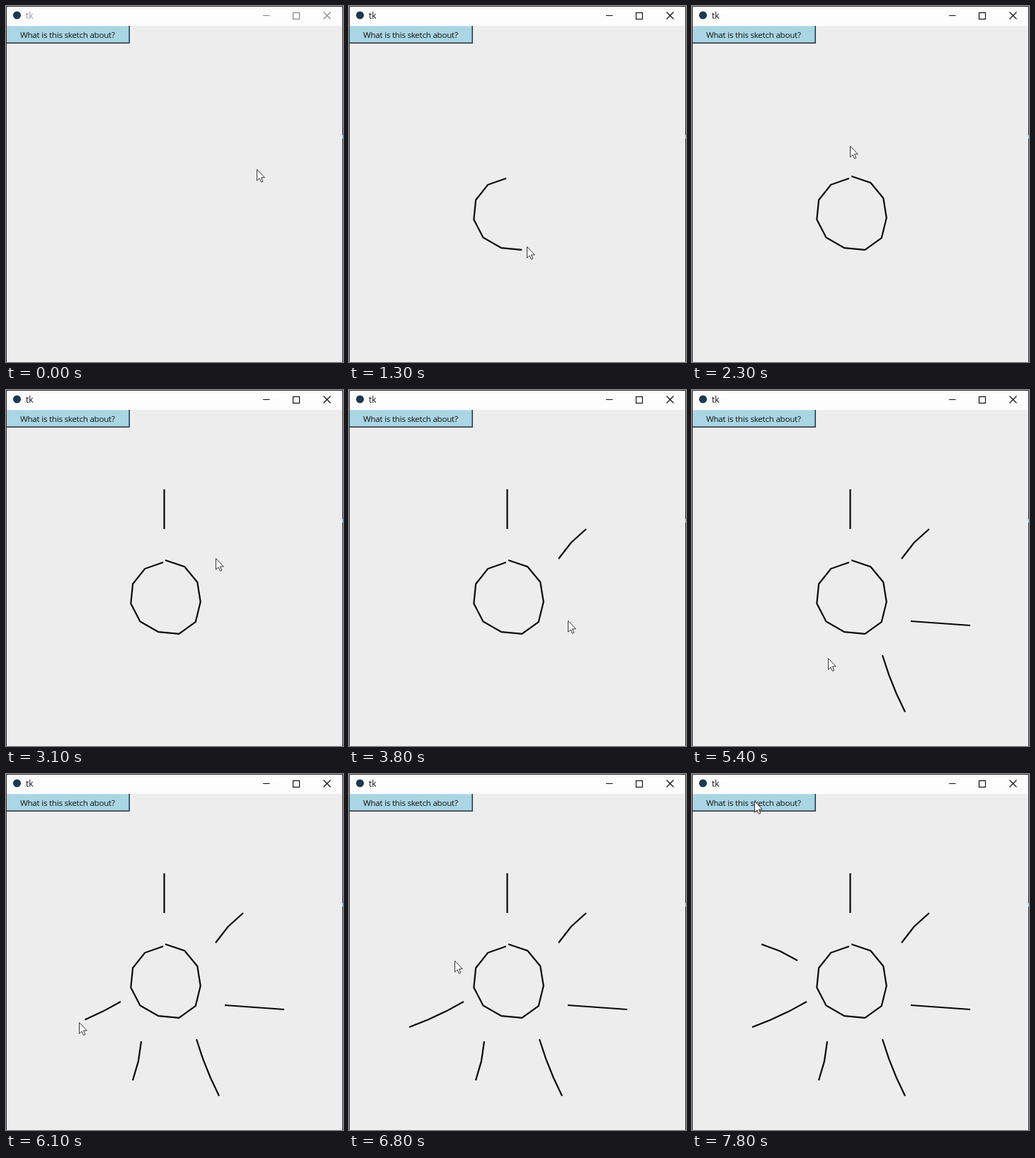
Animation of 476 by 502 pixels, one loop 8 s. Source, as an HTML page:

```html
<!DOCTYPE html>
<html lang="en">
<head>
<meta charset="utf-8">
<title>tk</title>
<style>
  html, body { margin: 0; width: 100%; height: 100%; overflow: hidden; background: #ededed; }
  svg { display: block; width: 476px; height: 502px; }
  text { font-family: "Open Sans", "Noto Sans", sans-serif; }
  .title { font-size: 12px; fill: #111; }
  .label { font-size: 11.6px; letter-spacing: -.24px; fill: #111; }
  .controls { fill: none; stroke: #111; stroke-width: 1.2; }
  .inactive .title { fill: #999; }
  .inactive .controls { stroke: #858585; }
  #ink { fill: none; stroke: #080808; stroke-width: 2.2; }
</style>
</head>
<body>
<svg id="stage" class="inactive" viewBox="0 0 476 502">
  <rect width="476" height="502" fill="#ededed"/>
  <rect width="476" height="28" fill="#fdfdfd"/>
  <circle cx="15.5" cy="13" r="5.5" fill="#1d3850"/>
  <text class="title" x="28" y="18">tk</text>
  <g class="controls">
    <path d="M363 13.5h9.5M448.5 8.5l10 10m0-10l-10 10"/>
    <rect x="405.5" y="9.5" width="9" height="9"/>
  </g>

  <rect y="28" width="175" height="25" fill="#2f3b40"/>
  <rect y="28" width="174" height="24" fill="#5f7a84"/>
  <rect y="28" width="173" height="23" fill="#c4e2ec"/>
  <rect x="1" y="29" width="172" height="22" fill="#a9d5e4"/>
  <text class="label" x="20" y="44.5">What is this sketch about?</text>

  <path d="M.5 502V.5H475.5V502" fill="none" stroke="#2b2b2b"/>
  <rect x="475" y="182" width="1" height="5" fill="#7fb8e0"/>

  <path id="ink"/>
  <path id="cursor" d="M.5 .5V16.3L4 12.8L6.5 18.3L8.8 17.3L6.4 11.9H11.3Z"
        fill="#fff" stroke="#333"/>
</svg>
<script>
  const LOOP = 8000, STEP = 100, FOCUS = 7;
  const SPACING = 28;    // pixels of ink per step
  const LEAD = 0.3;      // steps the pointer runs ahead of the ink
  const OVERSHOOT = 18;  // pixels the pointer glides on after a stroke

  const stage = document.getElementById('stage');
  const ink = document.getElementById('ink');
  const cursor = document.getElementById('cursor');

  const bell = x => Math.exp(-x * x);
  const easeOut = u => 1 - (1 - u) ** 3;
  const mix = (a, b, k) => a.map((v, i) => v + (b[i] - v) * k);

  // Hand-drawn ring, counter-clockwise from the top, bulging at the lower right
  function ring(at, cx, cy) {
    const pts = Array.from({ length: 12 }, (_, i) => {
      const angle = (-93 - 32.4 * i - 4.5 * bell((i - 5.3) / 1.4)) * Math.PI / 180;
      const r = 49 + 3 * (i / 11) ** 4 + 8 * bell(i - 6.5);
      return [cx + r * Math.cos(angle), cy + r * Math.sin(angle)];
    });
    return { at, pts };
  }

  // Slightly bowed line; bend is the sideways offset of its middle
  function ray(at, from, to, bend) {
    const dx = to[0] - from[0], dy = to[1] - from[1], len = Math.hypot(dx, dy);
    const n = Math.round(len / SPACING);
    const pts = Array.from({ length: n + 1 }, (_, i) => {
      const u = i / n, side = 4 * u * (1 - u) * bend / len;
      const [x, y] = mix(from, to, u);
      return [x - dy * side, y + dx * side];
    });
    return { at, pts };
  }

  const strokes = [
    ring(7, 224.5, 292),
    ray(25, [223.5, 196], [223.5, 140], 0),
    ray(32, [296, 238], [335, 196], -2.5),
    ray(39, [309, 326], [393, 332], 0),
    ray(48, [269, 374], [301, 454], 2),
    ray(55, [191, 377], [179, 432], -2),
    ray(59, [162, 321], [85, 357], -2),
    ray(69, [149, 263], [98, 240], 2)
  ];

  // Pointer keys follow each stroke and glide past its end.
  const keys = [{ t: 0, p: [354, 230] }];
  for (const { at, pts } of strokes) {
    pts.forEach((p, i) => keys.push({ t: at + i - LEAD, p, ease: i === 0 }));
    const [a, b] = pts.slice(-2);
    const reach = 1 + OVERSHOOT / Math.hypot(b[0] - a[0], b[1] - a[1]);
    keys.push({ t: at + pts.length - LEAD, p: mix(a, b, reach) });
  }
  keys.push({ t: 73, p: keys[keys.length - 1].p });
  keys.push({ t: 78, p: [88, 38], ease: true }, { t: 80, p: [88, 38] });

  function pointerAt(step) {
    const i = keys.findIndex(k => k.t > step);
    const a = keys[i - 1], b = keys[i];
    const u = (step - a.t) / (b.t - a.t);
    return mix(a.p, b.p, b.ease ? easeOut(u) : u).map(Math.round);
  }

  function inkAt(step) {
    return strokes
      .map(({ at, pts }) => pts.slice(0, Math.max(0, step - at + 1)))
      .filter(pts => pts.length > 1)
      .map(pts => 'M' + pts.join('L'))
      .join('');
  }

  let shown = -1;
  function draw(now) {
    const step = Math.floor(now % LOOP / STEP);
    if (step === shown) return;
    shown = step;
    stage.classList.toggle('inactive', step < FOCUS);
    ink.setAttribute('d', inkAt(step));
    cursor.setAttribute('transform', `translate(${pointerAt(step)})`);
  }

  const start = performance.now();
  function tick() {
    draw(performance.now() - start);
    requestAnimationFrame(tick);
  }
  tick();
</script>
</body>
</html>
```
